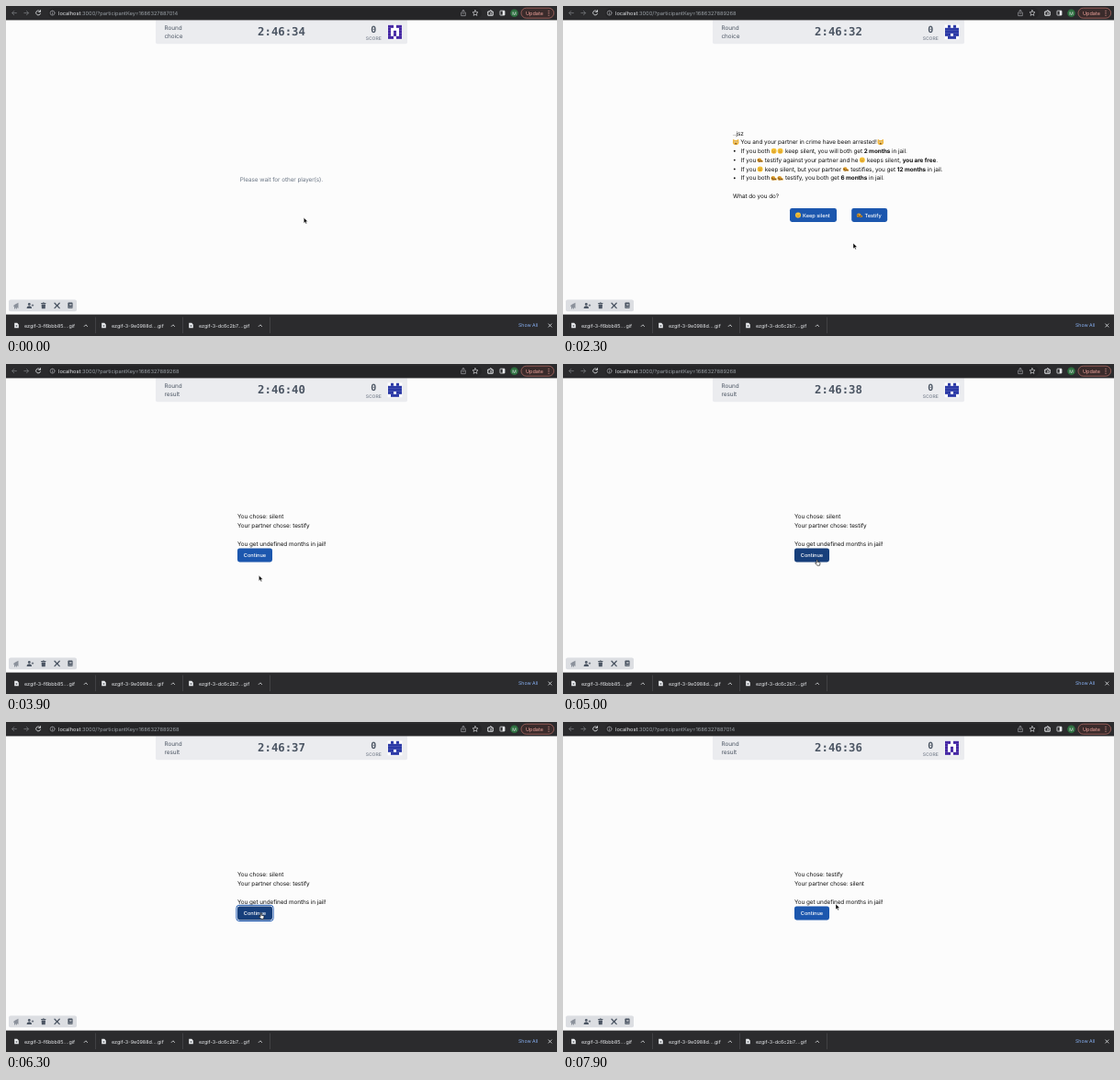
Recreate the animation shown at these times as an HTML page. Size 600 by 359 pixels, loop 8 s.

```html
<!DOCTYPE html>
<html lang="en">
<head>
<meta charset="utf-8">
<title>Round choice</title>
<style>
  html, body { margin: 0; width: 100%; height: 100%; overflow: hidden; background: #fcfcfc; }
  svg { display: block; width: 100vw; height: 100vh; }
  text { font-family: Inter, sans-serif; text-rendering: geometricPrecision; white-space: pre; }
  .body { font-size: 6.4px; letter-spacing: -.065px; fill: #111; }
  .bold { font-weight: 700; }
  .ui { font-size: 5.7px; fill: #e8eaed; }
  .mono { font-family: "DejaVu Sans Mono", monospace; font-weight: 700; fill: #4b5563; text-anchor: middle; }
  .label { font-size: 5.65px; font-weight: 500; fill: #fff; letter-spacing: 0; }
  .line { fill: none; stroke: #e8eaed; stroke-width: .8; stroke-linecap: round; stroke-linejoin: round; }
</style>
</head>
<body>
<svg id="stage" viewBox="0 0 600 359" preserveAspectRatio="none"></svg>
<script>
const LOOP = 8000, STEP = 100;
const HOST = 'localhost';

const text = (x, y, content, cls = 'body', attrs = '') =>
  `<text x="${x}" y="${y}" class="${cls}" ${attrs}>${content}</text>`;
const rect = (x, y, w, h, fill, r = 0, attrs = '') =>
  `<rect x="${x}" y="${y}" width="${w}" height="${h}" rx="${r}" fill="${fill}" ${attrs}/>`;
const circle = (x, y, r, fill) => `<circle cx="${x}" cy="${y}" r="${r}" fill="${fill}"/>`;
const path = (d, attrs = 'class="line"') => `<path d="${d}" ${attrs}/>`;
const group = (id, content) => `<g id="${id}">${content}</g>`;
const at = (x, y, content) => `<g transform="translate(${x} ${y})">${content}</g>`;

// Small pictograms, centred on x, y
const face = (x, y) => at(x, y, circle(0, 0, 3, '#f8c53a') +
  circle(-1.1, -.7, .45, '#5b3b16') + circle(1.1, -.7, .45, '#5b3b16') +
  rect(-1.7, .7, 3.4, 1, '#c98628', .5));
const cat = (x, y) => at(x, y,
  path('M-3-3.2l2 1.2h2l2-1.2.3 3.6Q3 3 0 3T-3.3.4z', 'fill="#efb53c"') +
  circle(-1.2, -.3, .7, '#fff') + circle(1.2, -.3, .7, '#fff') +
  circle(-1.2, -.3, .35, '#333') + circle(1.2, -.3, .35, '#333') +
  rect(-.8, 1, 1.6, 1.4, '#6e4a22', .6));
const talker = (x, y) => at(x, y,
  path('M-3.2.4Q-3.2-2.2-.8-2.2T1.5-.2L3.2.6 3 2.2H-2.4z', 'fill="#d99a2b"') +
  path('M-2.6-.2l1.6.5M.2.9l2.2.5M-1.6 1.6h1.8', 'fill="none" stroke="#5e3a1a" stroke-width=".8"'));

const identicon = (rows, color) => rows.map((row, j) => [...row].map((bit, i) =>
  bit === '1' ? rect(416 + i * 3, 20.8 + j * 3, 3.05, 3.05, color) : '').join('')).join('');

const buttons = {
  silent: { x: 247, y: 220, w: 51, content: face(256, 227.6) + text(261, 229.6, 'Keep silent', 'label') },
  testify: { x: 314.2, y: 220, w: 39, content: talker(323, 227.6) + text(328.4, 229.6, 'Testify', 'label') },
  next: { x: 252, y: 200.4, w: 38, content: text(271, 210, 'Continue', 'label', 'text-anchor="middle"') }
};
const HEIGHT = 15;

function button(id) {
  const { x, y, w, content } = buttons[id];
  const ring = rect(x - 1.1, y - 1.1, w + 2.2, HEIGHT + 2.2, '#fff', 3, `id="${id}-ring" stroke="#1d58b0" stroke-width="1"`);
  return ring + rect(x, y, w, HEIGHT, '#1c57ae', 2.4, `id="${id}-fill"`) + content;
}

function browser() {
  const url = `<text x="57" y="9.8" class="ui">${HOST}<tspan fill="#9aa0a6">:3000/?participantKey=<tspan id="key"></tspan></tspan></text>`;
  const dim = 'fill="none" stroke="#77797d" stroke-width=".8"';
  return rect(0, 0, 600, 15.4, '#2b2b2d') +
    rect(46, 2, 472, 11.4, '#252527', 5.7) +
    path('M11.8 7.6H6.6m2.4-2.4L6.6 7.6 9 10', dim) +
    path('M19.4 7.6h5.2m-2.4-2.4 2.4 2.4-2.4 2.4', dim) +
    path('M37.2 5.9A2.5 2.5 0 1 0 37.5 8.4M37.5 4.6v1.8h-1.8') +
    path('M50.6 7.2v2M50.6 5.7v.1M53.1 7.6a2.5 2.5 0 1 1-5 0 2.5 2.5 0 1 1 5 0', 'class="line" style="stroke:#b5b8bc;stroke-width:.6"') +
    url +
    path('M496.6 7h-.9v3.6h4.6V7h-.9M498 8.6V4.4m-1.2 1.2L498 4.4l1.2 1.2', 'class="line" style="stroke:#b5b8bc;stroke-width:.6"') +
    path('M511 4.6l.9 2 2.1.2-1.6 1.4.5 2.2-1.9-1.2-1.9 1.2.5-2.2L508 6.8l2.1-.2z', 'class="line" style="stroke-width:.6"') +
    path('M525.2 6h1.5q.2-1.4 1.1-1.4T528.8 6h1.4v4.2h-5zM528 7v2.2', 'class="line" style="stroke-width:1"') +
    rect(538, 5.2, 5, 4.8, 'none', .5, 'stroke="#e8eaed" stroke-width=".8"') + rect(540.7, 5.2, 2.3, 4.8, '#e8eaed') +
    circle(553.5, 7.7, 4.3, '#2e7040') +
    text(553.5, 9.5, 'M', 'ui', 'text-anchor="middle" style="font-size:5px"') +
    rect(561, 2.2, 35.6, 11, '#3a2b2b', 5.5, 'stroke="#bd7069" stroke-width=".7"') +
    text(566, 9.7, 'Update', 'ui', 'style="font-size:5.5px;fill:#f0a49c"') +
    [5.3, 7.7, 10.1].map(y => circle(591, y, .6, '#f0a49c')).join('');
}

function downloads() {
  const files = ['f6bbb85', '9e0988d', 'dc6c2b7'];
  return rect(0, 335.6, 600, 23.4, '#2b2b2d') + files.map((hash, i) => {
    const x = i * 95;
    return path(`M${x + 9.2} 344.8h3l1.6 1.6v3.8h-4.6z`, 'fill="#e8eaed"') +
      circle(x + 11.5, 348, .9, '#6f7378') +
      text(x + 20, 349.6, `ezgif-3-${hash}....gif`, 'ui', 'style="font-size:5.4px"') +
      path(`M${x + 85.2} 348.5l1.7-1.7 1.7 1.7`) +
      rect(x + 97, 338.5, .6, 17.5, '#505154');
  }).join('') +
    text(558, 349.2, 'Show All', 'ui', 'style="font-size:5.2px;fill:#8ab4f8"') +
    path('M590.8 345.9l3.2 3.2m0-3.2l-3.2 3.2');
}

function header() {
  return path('M163 15.4h274v23.8q0 2-2 2H165q-2 0-2-2z', 'fill="#ebecef"') +
    text(172.5, 26.4, 'Round', 'body', 'style="fill:#4b5563"') +
    text(172.5, 34.9, '', 'body', 'id="phase" style="fill:#4b5563"') +
    text(300, 32.3, '', 'mono', 'id="clock" font-size="12.3"') +
    text(400.2, 29.1, '0', 'mono', 'font-size="10"') +
    text(400.2, 37.3, 'SCORE', 'ui', 'text-anchor="middle" style="font-size:5px;font-weight:600;fill:#858c98"') +
    rect(415.6, 20.4, 15.8, 15.8, '#fff') +
    group('avatarA', identicon(['11011', '10001', '10101', '10101', '11011'], '#4628a4')) +
    group('avatarB', identicon(['01010', '11111', '11111', '11011', '01110'], '#2b39a6'));
}

function tools() {
  const ink = 'fill="#4b5563"';
  return rect(3, 319.4, 74, 12.8, '#dcdee2', 2) +
    path('M8 326l2-1.5 3.5-1.8v6.2l-1.5-1v1.6h-1v-2l-1 2H9v-2z', 'fill="#8b919b"') +
    circle(25.3, 324.4, 1.4, '#4b5563') + path('M22.6 329q0-2.7 2.7-2.7t2.7 2.7z', ink) +
    path('M29 324.4v2.4m-1.2-1.2h2.4', 'stroke="#4b5563" stroke-width=".7"') +
    path('M38.2 323h5.2v.9h-5.2zM40 322.4h1.6v.7H40zM38.6 324.4h4.4l-.3 4.8h-3.8z', ink) +
    path('M53 323.2l5.2 5.4m0-5.4l-5.2 5.4', 'stroke="#4b5563" stroke-width="1.3" stroke-linecap="round"') +
    rect(67.4, 322.6, 5.2, 6.4, '#4b5563', .8) +
    rect(69, 324, 2.6, .6, '#dcdee2') + rect(69, 325.3, 2.6, .6, '#dcdee2') + rect(68.3, 327.6, 4.3, .6, '#dcdee2');
}

function choiceScreen() {
  const bullet = y => circle(186.8, y - 2.2, .95, '#111');
  const rows = [160, 169.8, 179.6, 189.4];
  const [a, b, c, d] = rows;
  return text(185, 140.6, '..jsz') +
    cat(188.2, 148) + text(193.3, 150.3, 'You and your partner in crime have been arrested!') + cat(345.8, 148) +
    rows.map(bullet).join('') +
    text(193.6, a, 'If you both') + face(229.6, a - 2.2) + face(236.6, a - 2.2) +
    text(242, a, 'keep silent, you will both get <tspan class="bold">2 months</tspan> in jail.') +
    text(193.6, b, 'If you') + talker(214.6, b - 2.2) + text(219.8, b, 'testify against your partner and he') +
    face(325.8, b - 2.2) + text(331, b, 'keeps silent, <tspan class="bold">you are free</tspan>.') +
    text(193.6, c, 'If you') + face(214.6, c - 2.2) + text(219.8, c, 'keep silent, but your partner') +
    talker(308, c - 2.2) + text(313.2, c, 'testifies, you get <tspan class="bold">12 months</tspan> in jail.') +
    text(193.6, d, 'If you both') + talker(229.6, d - 2.2) + talker(236.6, d - 2.2) +
    text(242, d, 'testify, you both get <tspan class="bold">6 months</tspan> in jail.') +
    text(185, 209, 'What do you do?') +
    button('silent') + button('testify');
}

const resultScreen = () =>
  text(252, 168.3, '', 'body', 'id="mine"') + text(252, 178.1, '', 'body', 'id="theirs"') +
  text(252, 197.7, 'You get undefined months in jail!') + button('next');

const pointer = group('pointer',
  group('arrow', path('M0 0v6l1.4-1.3.9 2.1 1-.4-.9-2.1h1.9z', 'fill="#000" stroke="#fff" stroke-width=".45"')) +
  group('hand', path('M-.5 0q.6-.6 1.1 0v2.2l2.3.6q.6.3.5 1L2.9 6.2H.2L-1.9 3.9q-.1-.8.6-.7l.8.6z',
    'fill="#fff" stroke="#000" stroke-width=".6"')));

const stage = document.getElementById('stage');
stage.innerHTML = rect(0, 0, 600, 359, '#fcfcfc') +
  group('wait', text(300, 190.5, 'Please wait for other player(s).', 'body', 'text-anchor="middle" style="fill:#6b7685"')) +
  group('choice', choiceScreen()) + group('result', resultScreen()) +
  header() + tools() + browser() + downloads() + pointer;

const el = Object.fromEntries([...stage.querySelectorAll('[id]')].map(node => [node.id, node]));
const show = (id, on) => { el[id].style.display = on ? '' : 'none'; };
const set = (id, value) => { if (el[id].textContent !== value) el[id].textContent = value; };

const screens = [[0, 'A', 'wait'], [1600, 'B', 'choice'], [3400, 'B', 'result'], [7500, 'A', 'result']];
const ticks = [[0, 34], [900, 33], [1900, 32], [2900, 31], [3400, 40], [4000, 39], [5000, 38], [6000, 37], [7000, 36]];
const focus = [[0, ''], [3000, 'silent'], [3400, ''], [6000, 'next'], [7500, '']];
const moves = [
  [0, 324.3, 230.3], [600, 324.3, 230.3], [1100, 506.5, 10.8], [1300, 515, -9], [1600, 505, -9],
  [2300, 316, 258], [2800, 275.3, 231], [3800, 275.3, 231], [4500, 276.6, 213], [5000, 276.6, 213],
  [5700, 277.6, 208], [6500, 277.6, 208], [7200, 505, -9], [7500, 505, -9], [7900, 297, 198]
];

const current = (table, t) => table.findLast(row => row[0] <= t);

function position(t) {
  const i = moves.findLastIndex(row => row[0] <= t);
  const [t0, x0, y0] = moves[i], [t1, x1, y1] = moves[i + 1] || [LOOP, x0, y0];
  const k = (t - t0) / (t1 - t0), ease = k * k * (3 - 2 * k);
  return [x0 + (x1 - x0) * ease, y0 + (y1 - y0) * ease];
}

function render(t) {
  const [, player, screen] = current(screens, t);
  const focused = current(focus, t)[1];
  const [x, y] = position(t);
  let overButton = false;

  for (const id of ['wait', 'choice', 'result']) show(id, id === screen);
  for (const id of ['A', 'B']) show('avatar' + id, id === player);
  set('key', player === 'A' ? '1686327887014' : '1686327889268');
  set('phase', screen === 'result' ? 'result' : 'choice');
  set('clock', '2:46:' + current(ticks, t)[1]);
  set('mine', 'You chose: ' + (player === 'A' ? 'testify' : 'silent'));
  set('theirs', 'Your partner chose: ' + (player === 'A' ? 'silent' : 'testify'));

  for (const [id, b] of Object.entries(buttons)) {
    const active = screen === (id === 'next' ? 'result' : 'choice');
    const hover = active && x > b.x && x < b.x + b.w && y > b.y && y < b.y + HEIGHT;
    overButton ||= hover;
    el[id + '-fill'].setAttribute('fill', hover || focused === id ? '#173f7b' : '#1c57ae');
    show(id + '-ring', focused === id);
  }
  show('hand', overButton);
  show('arrow', !overButton);
  el.pointer.setAttribute('transform', `translate(${x} ${y})`);
}

const start = performance.now();
function frame(now) {
  const t = Math.max(0, now - start) % LOOP;
  render(Math.floor(t / STEP) * STEP);
  requestAnimationFrame(frame);
}
render(0);
requestAnimationFrame(frame);
</script>
</body>
</html>
```
